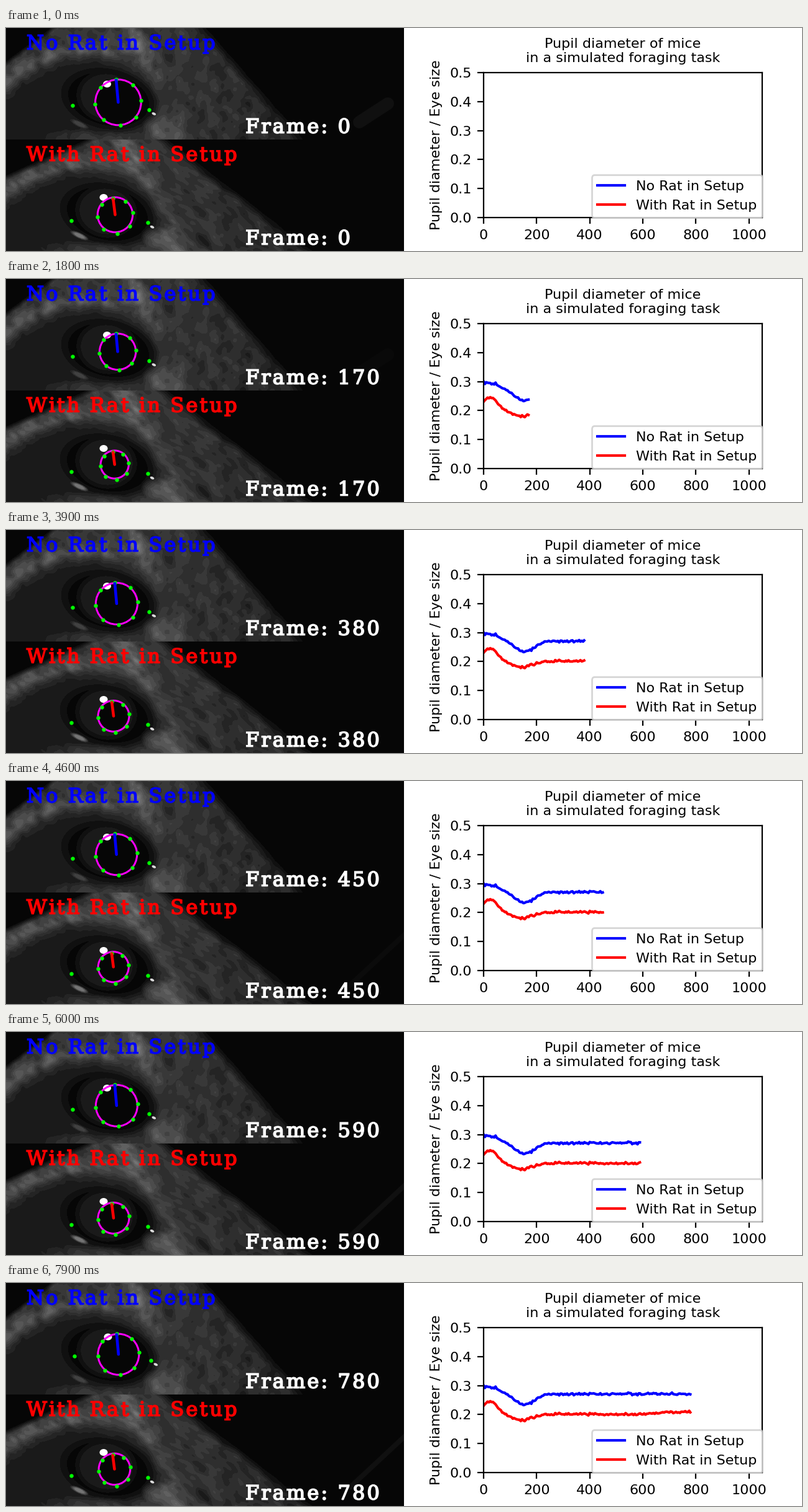
Animation of 1280x360 px, one loop 8000 ms. Source, as a matplotlib script:

```python
import numpy as np
import matplotlib.pyplot as plt
from matplotlib.animation import FuncAnimation
from matplotlib.patches import Circle, Ellipse, PathPatch
from matplotlib.path import Path
from matplotlib.textpath import TextPath
from matplotlib.transforms import Affine2D

STEPS, INTERVAL = 80, 100
DPI = 200
PX = 72 / DPI

plt.rcParams.update({"font.family": "DejaVu Sans", "font.size": 8,
                     "axes.titlesize": 8, "text.hinting": "force_autohint",
                     "text.hinting_factor": 8})
fig = plt.figure(figsize=(6.4, 1.8), dpi=DPI, facecolor="white")


# ---- camera pictures -------------------------------------------------

Y, X = np.mgrid[:180, :640] + 0.5


def mix(img, level, mask):
    return img + (level - img) * mask


def soft(distance, width):
    return np.clip(0.5 - distance / width, 0, 1)


def ellipse(cx, cy, rx, ry, tilt=0, blur=0.3):
    a = np.radians(tilt)
    u = (X - cx) * np.cos(a) + (Y - cy) * np.sin(a)
    v = (Y - cy) * np.cos(a) - (X - cx) * np.sin(a)
    return soft(np.hypot(u / rx, v / ry) - 1, blur)


def band(distance, width):
    return np.exp(-(distance / width) ** 2)


def mottle(seed, count=40):
    """Smooth streaks running down to the right."""
    rng = np.random.default_rng(seed)
    total = np.zeros_like(X)
    for _ in range(count):
        angle = np.radians(rng.normal(-30, 40))
        k = 2 * np.pi / rng.uniform(9, 60)
        total += np.sin(k * (X * np.cos(angle) + Y * np.sin(angle)) + rng.uniform(0, 6.3))
    return total / np.sqrt(count)


def scene(seed, edge, ridge, corner, arc, eye, streak):
    """Head and eye; edge and ridge are x = a + b*y, corner is y = a + b*x."""
    fur = mottle(seed)
    edge_x = edge[0] + edge[1] * Y
    ridge_x = ridge[0] + ridge[1] * Y
    corner_y = corner[0] + corner[1] * X
    arc_y = arc + 57 * np.exp(-X / 60)
    ex, ey = eye

    img = 52 + 8 * fur - 0.07 * np.clip(X - 260, 0, 200)
    img = mix(img, 26 + 2 * fur, soft(X - 150, 160) * soft(arc_y + 22 - Y, 30))
    img += (24 + 5 * fur) * band(Y - arc_y, 15) * soft(X - 215, 60)
    img += (28 + 8 * fur) * band(X - ridge_x, 19)
    img = mix(img, 26, ellipse(ex - 14, ey - 4, 105, 58, 10, 0.4))
    img = mix(img, 10, ellipse(ex, ey, 74, 47, 12, 0.25))
    img = mix(img, 23, ellipse(ex - 2, ey - 4, 46, 39, 10, 0.2))
    img = mix(img, 54 + 7 * fur, ellipse(ex + 5, 186, 85, 14, 5, 0.8))
    img = mix(img, 85 + 9 * fur, ellipse(ex + 92, 165, 27, 15, 20, 1))
    img = mix(img, streak, ellipse(118, 155, 12, 3.5, 25, 0.8))
    img = mix(img, 6, soft(Y - corner_y, 10))
    img = mix(img, 6, soft(edge_x - X, 24))
    return np.clip(np.round((img - 6) / 10) * 10 + 6, 6, 130)


top = scene(4, (312, 0.88), (203, 0.32), (58, -0.75), 29, (165, 115), 70)
bottom = scene(9, (250, 1.3), (188, 0.48), (62, -0.45), 29, (163, 120), 120)

view = fig.add_axes([0, 0, 0.5, 1])
view.imshow(np.vstack([top, bottom]), cmap="gray", vmin=0, vmax=255,
            extent=(0, 640, 360, 0), aspect="auto", interpolation="nearest")
view.set(xlim=(0, 640), ylim=(360, 0))
view.axis("off")


# ---- lettering -------------------------------------------------------

SIZE, TRACK = 32, 3.1


def glyphs(text):
    return TextPath((0, 0), text, size=SIZE, prop={"family": "DejaVu Serif"})


def advance(text):
    return glyphs(text + "|").get_extents().x1 - glyphs("|").get_extents().x1


def lettering(text):
    parts = []
    for k, char in enumerate(text):
        if char != " ":
            shift = Affine2D().translate(advance(text[:k]) + TRACK * k, 0)
            parts.append(shift.transform_path(glyphs(char)))
    return Path.make_compound_path(*parts)


def at(path, x, baseline):
    return Affine2D().scale(1, -1).translate(x, baseline).transform_path(path)


def add_text(text, x, baseline, color):
    patch = PathPatch(at(lettering(text), x, baseline), facecolor=color,
                      edgecolor=color, lw=1.7 * PX, zorder=9)
    return view.add_patch(patch)


# ---- measured diameters ----------------------------------------------

N = np.arange(800)


def pulse(mid, width):
    return np.exp(-((N - mid) / width) ** 2)


def jitter(seed, every=5, size=0.002):
    grid = np.arange(0, N.size + every, every)
    return np.interp(N, grid, np.random.default_rng(seed).normal(0, size, grid.size))


blue = 0.271 + 0.026 * pulse(10, 65) - 0.037 * pulse(153, 52) + jitter(3)
red = (0.201 + 0.046 * pulse(22, 38) - 0.020 * pulse(145, 50)
       + 0.008 * np.clip((N - 600) / 100, 0, 1) + jitter(8))


# ---- tracked eye -----------------------------------------------------

def smoothstep(t):
    t = np.clip(t, 0, 1)
    return t * t * (3 - 2 * t)


class Eye:
    """Pupil circle, landmarks and glints over one camera picture."""

    SCALE = 122.5  # pixels per unit of diameter

    def __init__(self, color, values, center, corners, glint, turn, sag, lift,
                 whisker, fade):
        self.values, self.center = values, np.array(center)
        self.corners, self.glint = np.array(corners), np.array(glint)
        self.lift, self.fade = np.array(lift), fade
        angles = np.radians(turn + 45 * np.arange(8))
        reach = 1.01 + sag * np.sin(angles)
        self.marks = np.column_stack([np.cos(angles), np.sin(angles)]) * reach[:, None]

        (x0, y0), (x1, y1), width = whisker
        self.whisker, = view.plot([x0, x1], [y0, y1], color="#101010", lw=width * PX,
                                  solid_capstyle="round", zorder=1)
        self.pupil = view.add_patch(Circle((0, 0), 1, color="#060606", zorder=2))
        self.spot = view.add_patch(Ellipse((0, 0), 13, 11, color="white", lw=0, zorder=3))
        self.spark = view.add_patch(Ellipse((0, 0), 7, 4, angle=25, color="#dcdcdc",
                                            lw=0, zorder=3))
        self.ring = view.add_patch(Circle((0, 0), 1, fill=False, ec="#ff00ff",
                                          lw=3 * PX, zorder=4))
        self.dots, = view.plot([], [], "o", color="#00ff00", ms=6.4 * PX, mew=0, zorder=5)
        self.radius, = view.plot([], [], color=color, lw=4.6 * PX,
                                 solid_capstyle="round", zorder=6)

    def update(self, step, n):
        r = self.values[n] * self.SCALE
        lift = self.lift * smoothstep((step - 60) / 19)
        drift = (1.4 * np.cos(2 * np.pi * step / 100), 0.35 * (r - self.values[0] * self.SCALE))
        center = self.center + drift + 0.5 * lift
        corners = self.corners + lift
        for disc in (self.pupil, self.ring):
            disc.set_center(center)
            disc.set_radius(r)
        points = np.vstack([self.marks * r + center, corners])
        self.dots.set_data(*points.T)
        self.radius.set_data(*np.array([center, points[0] + (0, 1)]).T)
        self.spot.set_center(self.glint + 0.5 * lift)
        self.spark.set_center(corners[1] + (7.5, 7))
        self.whisker.set_alpha(np.clip(self.fade(step), 0, 1))


eyes = [
    Eye("blue", blue, (179, 120), [(106.8, 124.5), (230.3, 131.5)], (162.5, 90.5),
        turn=-95, sag=0, lift=(3, -7),
        whisker=((568, 152), (614, 122), 20), fade=lambda step: 1 - step / 30),
    Eye("red", red, (174.1, 301.5), [(105, 311), (227.5, 314.2)], (157, 273.5),
        turn=-97, sag=0.08, lift=(0, 0),
        whisker=((553, 330), (645, 244), 8), fade=lambda step: (step - 40) / 10),
]

add_text("No Rat in Setup", 33, 34.5, "blue")
add_text("With Rat in Setup", 33, 214.5, "red")
counters = [(add_text("Frame: 0", 385, base, "white"), base) for base in (169.5, 349.5)]


# ---- chart -----------------------------------------------------------

chart = fig.add_axes([0.6, 0.15, 0.35, 0.65])
lines = [chart.plot([], [], color=color, label=label)[0]
         for color, label in (("blue", "No Rat in Setup"), ("red", "With Rat in Setup"))]
chart.set(xlim=(0, 1050), ylim=(0, 0.5), xticks=range(0, 1001, 200),
          yticks=np.arange(6) / 10, ylabel="Pupil diameter / Eye size",
          title="Pupil diameter of mice\nin a simulated foraging task")
chart.legend(loc="lower right", borderaxespad=0)


def draw(step):
    n = 10 * max(0, step - 1)
    for eye, line in zip(eyes, lines):
        eye.update(step, n)
        line.set_data(N[:n], eye.values[:n])
    label = lettering(f"Frame: {n}")
    for patch, base in counters:
        patch.set_path(at(label, 385, base))


anim = FuncAnimation(fig, draw, frames=STEPS, interval=INTERVAL, repeat=True)
plt.show()
```
